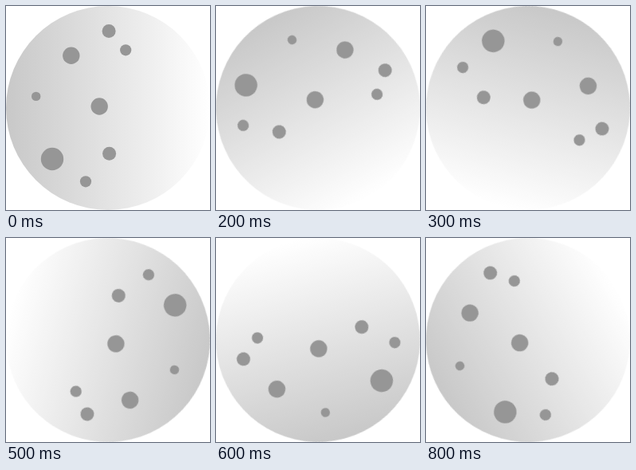
An HTML page for the animation above (900 ms loop, 256 px wide and 256 px high).

```html
<!DOCTYPE html>
<html lang="en">
<head>
<meta charset="utf-8">
<title>Rolling moon</title>
<style>
  html, body { margin: 0; height: 100%; overflow: hidden; background: #fff; }
  svg { display: block; width: 100%; height: 100%; }
  .moon {
    transform-origin: 128px 128px;
    animation: roll 900ms step-end infinite;
  }
  /* Nine held poses, fastest in the middle of the turn */
  @keyframes roll {
    0%     { transform: rotate(0deg); }
    11.11% { transform: rotate(30deg); }
    22.22% { transform: rotate(60deg); }
    33.33% { transform: rotate(105deg); }
    44.44% { transform: rotate(150deg); }
    55.55% { transform: rotate(195deg); }
    66.66% { transform: rotate(255deg); }
    77.77% { transform: rotate(300deg); }
    88.88% { transform: rotate(330deg); }
    100%   { transform: rotate(360deg); }
  }
</style>
</head>
<body>
<svg viewBox="0 0 256 256">
  <defs>
    <linearGradient id="shade">
      <stop offset="0" stop-color="#c8c8c8"/>
      <stop offset="1" stop-color="#fff"/>
    </linearGradient>
  </defs>
  <g class="moon">
    <circle cx="128" cy="128" r="128" fill="url(#shade)"/>
    <g fill="#969696">
      <circle cx="129.1" cy="31.5" r="8.5"/>
      <circle cx="150.2" cy="55.3" r="7.1"/>
      <circle cx="81.8" cy="62.2" r="10.7"/>
      <circle cx="37.7" cy="113.4" r="5.7"/>
      <circle cx="117.2" cy="126" r="10.7"/>
      <circle cx="58" cy="192" r="14.2"/>
      <circle cx="129.6" cy="185.3" r="8.5"/>
      <circle cx="100" cy="220.3" r="7.1"/>
    </g>
  </g>
</svg>
</body>
</html>
```
